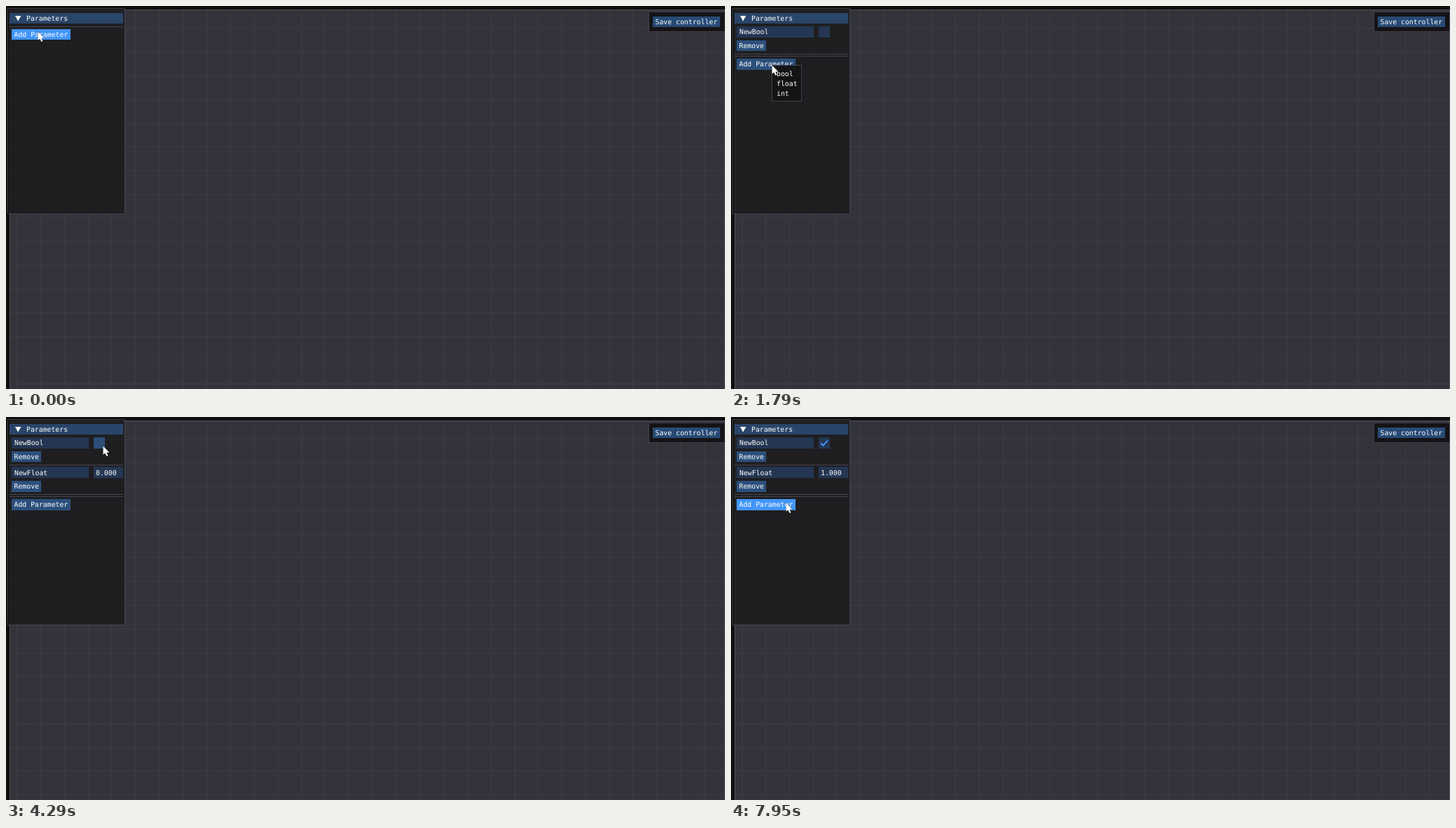
These frames come from a looping animation (1025x546 px, 8000 ms). An HTML page with a canvas:

```html
<!DOCTYPE html>
<html lang="en">
<head>
<meta charset="utf-8">
<title>Parameters panel</title>
<style>
  html, body { margin: 0; width: 100%; height: 100%; overflow: hidden; background: #0f0f0f; }
  canvas { display: block; }
</style>
</head>
<body>
<canvas id="stage" width="1025" height="546"></canvas>
<script>
const ctx = document.getElementById('stage').getContext('2d');
const LOOP = 8000, CELL = 33.77, ROW = 42.2, FRAME = 15.8, ITEM = 14.4;
const BLUE = '#4296fa', BUTTON = 'rgba(66,150,250,.42)', FIELD = 'rgba(41,74,122,.56)';
const BORDER = 'rgba(110,110,128,.5)';
const BOOL_ADDED = 990, FLOAT_ADDED = 3400, CHECKED = 4710;
const SELECTED = 5550, TYPED = 6080, COMMITTED = 7240;

const popups = [
  { from: 180, to: BOOL_ADDED, x: 45, y: 34 },
  { from: 1790, to: FLOAT_ADDED, x: 58, y: 84 }
];

// Each gesture eases the pointer to a place, where it rests until the next one.
const home = { x: 45, y: 36 };
const gestures = [
  { from: 180, to: 380, x: 48, y: 25 },
  { from: 380, to: 890, x: 66, y: 47 },
  { from: 1130, to: 1740, x: 58, y: 84 },
  { from: 1930, to: 2690, x: 78, y: 122 },
  { from: 2880, to: 3030, x: 78, y: 107 },
  { from: FLOAT_ADDED, to: 3640, x: 80, y: 86 },
  { from: 3640, to: 4060, x: 138, y: 41 },
  { from: CHECKED, to: 4990, x: 164, y: 86 },
  { from: 5500, to: 5690, x: 161, y: 80 },
  { from: 5920, to: 6490, x: 124, y: 134 },
  { from: COMMITTED, to: 7770, x: 78, y: 122 }
];

function pointerAt(t) {
  let { x, y } = home;
  for (const g of gestures) {
    const k = Math.min(1, Math.max(0, (t - g.from) / (g.to - g.from)));
    const ease = k * k * (3 - 2 * k);
    x += (g.x - x) * ease;
    y += (g.y - y) * ease;
  }
  return { x: Math.round(x), y: Math.round(y) };
}

const inside = (p, x, y, w, h) => p.x >= x && p.x < x + w && p.y >= y && p.y < y + h;

// Fills a rectangle with its edges snapped to whole pixels.
function box(x, y, w, h, fill) {
  const left = Math.round(x), top = Math.round(y);
  ctx.fillStyle = fill;
  ctx.fillRect(left, top, Math.round(x + w) - left, Math.round(y + h) - top);
}

function frame(x, y, w, h, fill) {
  box(x, y, w, h, fill);
  ctx.strokeStyle = BORDER;
  ctx.lineWidth = 1;
  ctx.strokeRect(x + .5, y + .5, w - 1, h - 1);
}

function label(text, x, middle) {
  ctx.fillStyle = '#fff';
  ctx.fillText(text, x, Math.round(middle + 3.4));
}

function button(text, x, y, w, hot) {
  box(x, y, w, FRAME, hot ? BLUE : BUTTON);
  label(text, x + 3.5, y + FRAME / 2);
}

function polygon(points, fill, stroke) {
  ctx.beginPath();
  points.forEach(([x, y]) => ctx.lineTo(x, y));
  ctx.closePath();
  if (stroke) {
    ctx.strokeStyle = stroke;
    ctx.lineWidth = 1;
    ctx.stroke();
  }
  ctx.fillStyle = fill;
  ctx.fill();
}

const separator = y => box(5, y, 162, 1, BORDER);

function drawBackdrop() {
  box(0, 0, 1025, 546, '#0f0f0f');
  box(5, 5, 1020, 541, '#33343b');
  for (let x = 15.9; x < 1025; x += CELL) box(Math.floor(x), 5, 1, 541, '#3c3d40');
  for (let y = 32.1; y < 546; y += CELL) box(5, Math.floor(y), 1020, 1, '#3c3d40');
  ctx.strokeStyle = '#505158';
  ctx.lineWidth = 1;
  ctx.strokeRect(5.5, 5.5, 1019, 560);
  frame(916, 8, 109, 29, 'rgba(17,15,16,.86)');
  button('Save controller', 922, 14.6, 96, false);
}

function drawRow(index, name) {
  const y = 29 + ROW * index;
  box(8, y, 110, FRAME, FIELD);
  label(name, 12, y + 8);
  button('Remove', 8, y + 19.6, 42.4, false);
  separator(y + 39.2);
}

function drawCheckbox(checked, hot) {
  box(125, 29, 16, FRAME, hot ? 'rgba(66,150,250,.4)' : FIELD);
  if (!checked) return;
  ctx.beginPath();
  ctx.moveTo(128, 37.2);
  ctx.lineTo(131.3, 40.6);
  ctx.lineTo(138, 33.4);
  ctx.strokeStyle = BLUE;
  ctx.lineWidth = 2;
  ctx.stroke();
}

function drawNumber(t) {
  const y = 29 + ROW;
  const editing = t >= TYPED && t < COMMITTED;
  box(125, y, 42, FRAME, FIELD);
  if (t >= SELECTED && t < TYPED) box(128, y + 1, 30, 14, 'rgba(66,150,250,.35)');
  label(editing ? '1' : t < TYPED ? '0.000' : '1.000', 128, y + 8);
  if (editing) box(134, y + 3, 1, 10, '#fff');
}

function drawPopup({ x, y }, pointer) {
  frame(x, y, 43, 52, 'rgba(20,20,20,.95)');
  ['bool', 'float', 'int'].forEach((type, i) => {
    const top = y + 5 + ITEM * i;
    if (inside(pointer, x + 3, top, 37, ITEM)) box(x + 3, top, 37, ITEM, 'rgba(66,150,250,.8)');
    label(type, x + 7, top + ITEM / 2);
  });
}

function drawPointer({ x, y }, overText) {
  if (overText) {
    box(x, y - 6, 1, 13, '#fff');
    box(x - 2, y - 7, 5, 1, '#ddd');
    box(x - 2, y + 6, 5, 1, '#ddd');
    return;
  }
  const shape = [[0, 0], [0, 12.3], [2.8, 9.9], [4.9, 14.6], [7, 13.7], [5, 9.2], [8.8, 9]];
  polygon(shape.map(([dx, dy]) => [x + .5 + dx, y + .5 + dy]), '#fff', 'rgba(0,0,0,.6)');
}

function draw(t) {
  const pointer = pointerAt(t);
  const popup = popups.find(p => t >= p.from && t < p.to);
  const rows = (t >= BOOL_ADDED) + (t >= FLOAT_ADDED);
  const over = (...area) => !popup && inside(pointer, ...area);

  ctx.font = '9.82px "DejaVu Sans Mono", monospace';
  ctx.textRendering = 'geometricPrecision';
  drawBackdrop();

  frame(2, 3, 168, 294, 'rgba(17,15,16,.6)');
  box(5, 10, 162, 15, 'rgba(66,150,250,.33)');
  polygon([[13, 14], [21.5, 14], [17.2, 21.5]], '#fff');
  label('Parameters', 29, 17.6);

  if (rows > 0) {
    drawRow(0, 'NewBool');
    drawCheckbox(t >= CHECKED, over(125, 29, 16, 16));
  }
  if (rows > 1) {
    drawRow(1, 'NewFloat');
    drawNumber(t);
  }
  separator(29 + ROW * rows);
  const addY = 32.5 + ROW * rows;
  button('Add Parameter', 8, addY, 84, over(8, addY, 84, FRAME));

  if (popup) drawPopup(popup, pointer);
  const overText = rows > 0 && over(8, 29, 110, 16) ||
    rows > 1 && (over(8, 71, 110, 15) || over(125, 71, 43, 17));
  drawPointer(pointer, overText);
}

function tick() {
  draw(performance.now() % LOOP);
  requestAnimationFrame(tick);
}
tick();
</script>
</body>
</html>
```
